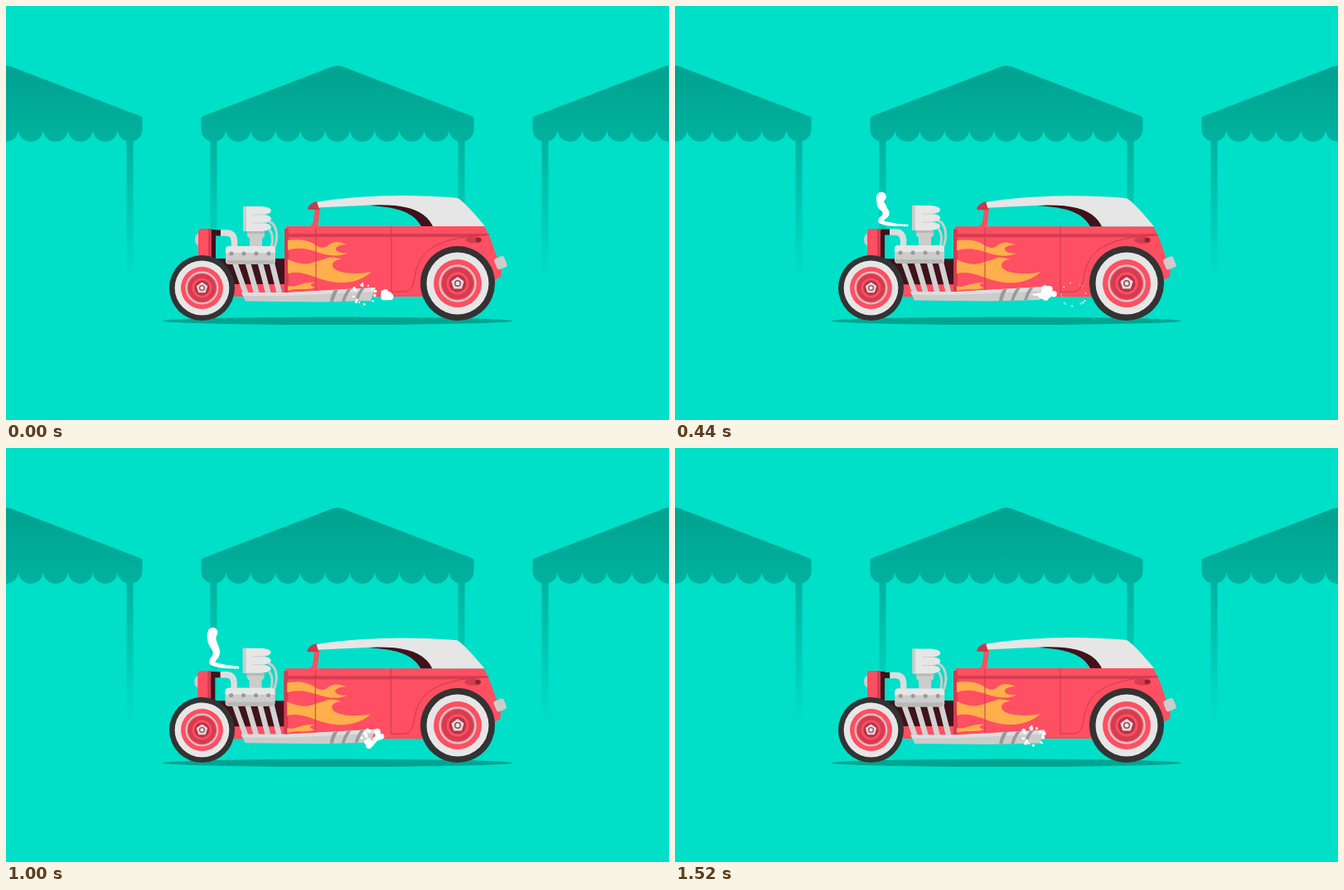
An HTML page that plays this animation: 800x500 px, repeating every 1560 ms.

```html
<!DOCTYPE html>
<html lang="en">
<head>
<meta charset="utf-8">
<title>Hot rod</title>
<style>
html, body { margin: 0; height: 100%; overflow: hidden; background: #00dfc8; }
svg { display: block; width: 100vw; height: 100vh; }
.red { fill: #ff4f62; } .dark { fill: #d63c50; } .bay { fill: #40121b; }
.light { fill: #e6e6e6; } .grey { fill: #ccc; } .steel { fill: #b8b8b8; }
.seam { fill: none; stroke: #c93a4c; stroke-width: 1; }
</style>
</head>
<body>
<svg viewBox="0 0 800 500">
  <defs>
    <linearGradient id="roofFade" gradientUnits="userSpaceOnUse" x1="0" y1="72" x2="0" y2="165">
      <stop offset=".2" stop-color="#00a592"/><stop offset="1" stop-color="#00b29f"/>
    </linearGradient>
    <linearGradient id="poleFade" gradientUnits="userSpaceOnUse" x1="0" y1="160" x2="0" y2="330">
      <stop offset="0" stop-color="#00b29f"/><stop offset="1" stop-color="#00b29f" stop-opacity="0"/>
    </linearGradient>
    <g id="tent">
      <path fill="url(#poleFade)" d="M-153.500 155h8v175h-8zM145.500 155h8v175h-8z"/>
      <path id="awning" fill="url(#roofFade)"/>
    </g>
    <g id="wheel">
      <circle r="45" fill="#333"/>
      <circle r="37.500" class="light"/>
      <circle r="29" class="red"/>
      <circle r="21.500" fill="#ff4f62" stroke="#d5c5c7" stroke-width="2.500"/>
      <circle r="19" class="dark"/>
      <circle r="13.500" class="red"/>
      <circle r="10.500" fill="#b93347"/>
      <path d="M0-6.500L6.200-2 3.800 5.300H-3.800L-6.200-2Z" fill="#ddd" stroke="#ddd" stroke-width="2.500" stroke-linejoin="round"/>
      <circle r="4" fill="#a04450"/><circle r="2.500" class="light"/>
    </g>
  </defs>

  <use href="#tent"/><use href="#tent" x="400"/><use href="#tent" x="800"/>
  <ellipse cx="400" cy="380.300" rx="211" ry="4.700" fill="#00a592"/>

  <g id="body">
    <path class="bay" d="M246 270h7v35h84v32h-91z"/>
    <path class="red" d="M272 336H338V266H577C584 277 588 291 592 302L598 316 597 327 589 331 540 351H276Z"/>
    <path class="dark" d="M336 269h5v77h-5zM341 275H580L582 277 560 279H341Z"/>
    <path fill="#ffaf4b" d="M340 283C356 281 366 283 374 289C380 293 386 292 389 289C394 284 402 284 411 288C403 288 397 291 398 294C400 298 406 299 413 298C404 303 390 302 378 298C364 293 352 291 340 295Z
      M340 306C352 312 364 313 373 309C380 307 382 306 386 305C392 302 400 304 405 306C396 306 391 312 396 317C404 324 425 324 441 321C428 333 408 337 388 332C372 328 356 318 340 323Z
      M340 338C350 341 357 332 374 334C366 335 366 338 373 340C362 344 350 340 340 344Z"/>
    <path class="seam" d="M374 267V345M465 266V345H480C495 344 491 327 497 313C504 295 522 279 583 276"/>
    <ellipse cx="564" cy="282.500" rx="10" ry="4" class="dark"/>
    <ellipse cx="570" cy="282.500" rx="3.500" ry="3" fill="#8f2636"/>
    <path class="bay" d="M438 241C475 236 508 246 516 266H501C492 250 475 243 438 241Z"/>
    <path class="light" d="M375 237C410 230 485 226 545 232Q553 236 578 266H515C505 245 480 239 440 240.500L376 243.500Z"/>
    <path class="red" d="M373 244h6L376 268H362Q370 266 371 260Z"/>
    <path fill="#c93a4c" d="M364 244Q368 237 375 236L378 246 365 246Z"/>
    <rect x="590" y="303" width="13" height="14" rx="3" class="grey" transform="rotate(-22 597 309)"/>
    <ellipse cx="232" cy="282" rx="4" ry="7" class="grey"/>
    <path class="red" d="M236 269h11v36h-15V273q0-4 4-4z"/>
    <path class="dark" d="M244 269h4v36h-4z"/>
  </g>

  <g id="engine">
    <path fill="none" stroke="#ccc" stroke-width="3" d="M317 260C328 264 329 280 323 294M318 270Q324 278 320 292"/>
    <path class="bay" d="M249 270.500h11v7h-11z"/>
    <path fill="none" stroke="#ddd" stroke-width="7.500" d="M259 274H266Q275 274 275.500 284V293"/>
    <path class="grey" d="M291 272h21v6l-3 3v11h-15v-11l-3-3z"/>
    <path class="steel" d="M291 272h21v3h-21z"/>
    <path class="light" d="M287 242h22q11 1 11 5t-9 5q9 1 9 5t-9 5q9 1 9 5t-11 5h-22z"/>
    <path class="grey" d="M286 242h4v30h-4zM298 251.500h14v1h-14zM298 261.500h14v1h-14z"/>
    <path fill="none" stroke="#d2d2d2" stroke-width="6.500" d="M276.500 311L290 349M292 311L303 349M307 311L317 349M321 311L330 347"/>
    <rect x="265" y="290" width="60" height="22" rx="4" class="grey"/>
    <path class="light" d="M269 290h52q4 0 4 5v3h-60v-3q0-5 4-5z"/>
    <path class="steel" d="M266 307h58l-2 5H268z"/>
    <g fill="#999"><circle cx="272" cy="299" r="2.500"/><circle cx="287" cy="299" r="2.500"/><circle cx="302" cy="299" r="2.500"/><circle cx="317" cy="299" r="2.500"/></g>
    <path class="grey" d="M284 346L340 346 446 340 440 356 380 357.500 289 356.500Z"/>
    <path fill="#ddd" d="M284 346L340 346 446 340 444 345 340 350 286 350Z"/>
    <path fill="#999" d="M396 343l5-.5Q397 349 395 357h-4Q392 349 396 343zM412 342l5-.5Q411 349 409 357h-4Q407 349 412 342zM428 341l5-.5Q427 348 425 356h-4Q423 348 428 341z"/>
  </g>

  <use href="#wheel" transform="translate(236.500 340.500) scale(.878)"/>
  <use href="#wheel" transform="translate(545 335)"/>
  <path id="smoke" fill="#fff"/>
</svg>
<script>
const LOOP = 1560, STEP = 40;
const el = id => document.getElementById(id);
const clamp = (v, lo = 0, hi = 1) => Math.min(hi, Math.max(lo, v));
const rand = n => { const v = Math.sin(n * 127.1 + 11.7) * 43758.5453; return v - Math.floor(v); };

const scallop = 329 / 11;
el('awning').setAttribute('d', 'M-164.500 136Q-164.500 134-162 133L-7 73.500Q0 70.500 7 73.500L162 133Q164.500 134 164.500 136V149'
  + `a${scallop / 2} 15 0 0 1 ${-scallop} 0`.repeat(11) + 'Z');

// time, body x, body y, engine x, engine y
const shake = [
  [0, 0, 0, 0, 0], [280, -1.5, .8, -2, 0], [440, 0, .3, 0, -1], [840, -1, -.5, -1, -2.5],
  [1120, -1, .4, -1, .4], [1280, -.5, -.3, 1.2, -3], [1520, 0, 0, .2, .4], [1560, 0, 0, 0, 0]
];

function pose(t) {
  const i = shake.findIndex(k => k[0] > t), a = shake[i - 1], b = shake[i];
  const u = (t - a[0]) / (b[0] - a[0]);
  const flutter = Math.sin(2 * Math.PI * u * Math.round((b[0] - a[0]) / 120));
  return [1, 2, 3, 4].map(c => a[c] + (b[c] - a[c]) * u + flutter * (c > 2 ? .8 : .4));
}

function blob(x, y, r) {
  if (r < .3) return '';
  const f = v => v.toFixed(2);
  return `M${f(x - r)} ${f(y)}a${f(r)} ${f(r)} 0 1 0 ${f(2 * r)} 0a${f(r)} ${f(r)} 0 1 0 ${f(-2 * r)} 0`;
}

// A puff swells at the pipe end, then bursts into a ring of crumbs.
function puff(t, start, x0, drift, seed) {
  const age = (t - start + LOOP) % LOOP, k = age / 520;
  if (k >= 1) return '';
  const grow = clamp((age + 70) / 130, 0, 1.15), x = x0 + drift * clamp(age / 260);
  const spread = 8 * grow + 7 * k;
  let d = '';
  for (let i = 0; i < 18; i++) {
    const n = seed * 40 + i, angle = rand(n) * 2 * Math.PI;
    const dist = spread * (k + (1 - k) * rand(n + 300));
    d += blob(x + Math.cos(angle) * dist, 348.5 + Math.sin(angle) * dist,
      (2.3 + 3.7 * rand(n + 600)) * grow * (1 - k) ** .9);
  }
  if (age > 30 && age < 90)
    for (let i = 0; i < 12; i++) d += blob(x - 20 + i * 1.6, 348.5, .4 + i * .27);
  return d;
}

// A plume leaves the intake, curls upward and breaks into dots.
function plume(t, start, size) {
  const age = t - start;
  if (age < 0 || age > 480) return '';
  const head = 272 - size * 70 * (1 - Math.exp(-age / 210));
  const tail = 265 - clamp((age - 190) * .2, 0, 28);
  const sweep = 26 * clamp((435 - age) / 230);
  const swell = clamp((age + 50) / 120) * (1 - age / 1100);
  const fade = clamp((age - 150) / 300);
  let d = '';
  for (let i = 0; i <= 50; i++) {
    const u = i / 50;
    const x = 251 + sweep * clamp(1 - u / .3) ** 1.5 + 5 * clamp(age / 275) * Math.sin((u - .43) * 10);
    const thin = clamp(1 - fade * (1 + Math.sin(u * 30)) * .8);
    d += blob(x, tail + (head - tail) * u ** 1.6, (2 + 5 * u) * swell * thin);
  }
  return d;
}

function draw(now) {
  const t = Math.floor(now % LOOP / STEP) * STEP;
  const [bx, by, ex, ey] = pose(t);
  const move = (id, x, y) => el(id).setAttribute('transform', `translate(${x} ${y})`);
  move('body', bx, by);
  move('engine', ex, ey);
  el('smoke').setAttribute('d', puff(t, -20, 457, 24, 1) + puff(t, 390, 448, 8, 2)
    + puff(t, 780, 435, 7, 3) + puff(t, 1170, 429, 3, 4)
    + plume(t, 250, 1) + plume(t, 845, 1.35));
}

let begin;
function tick(now) {
  begin ??= now;
  draw(now - begin);
  requestAnimationFrame(tick);
}
draw(0);
requestAnimationFrame(tick);
</script>
</body>
</html>
```
